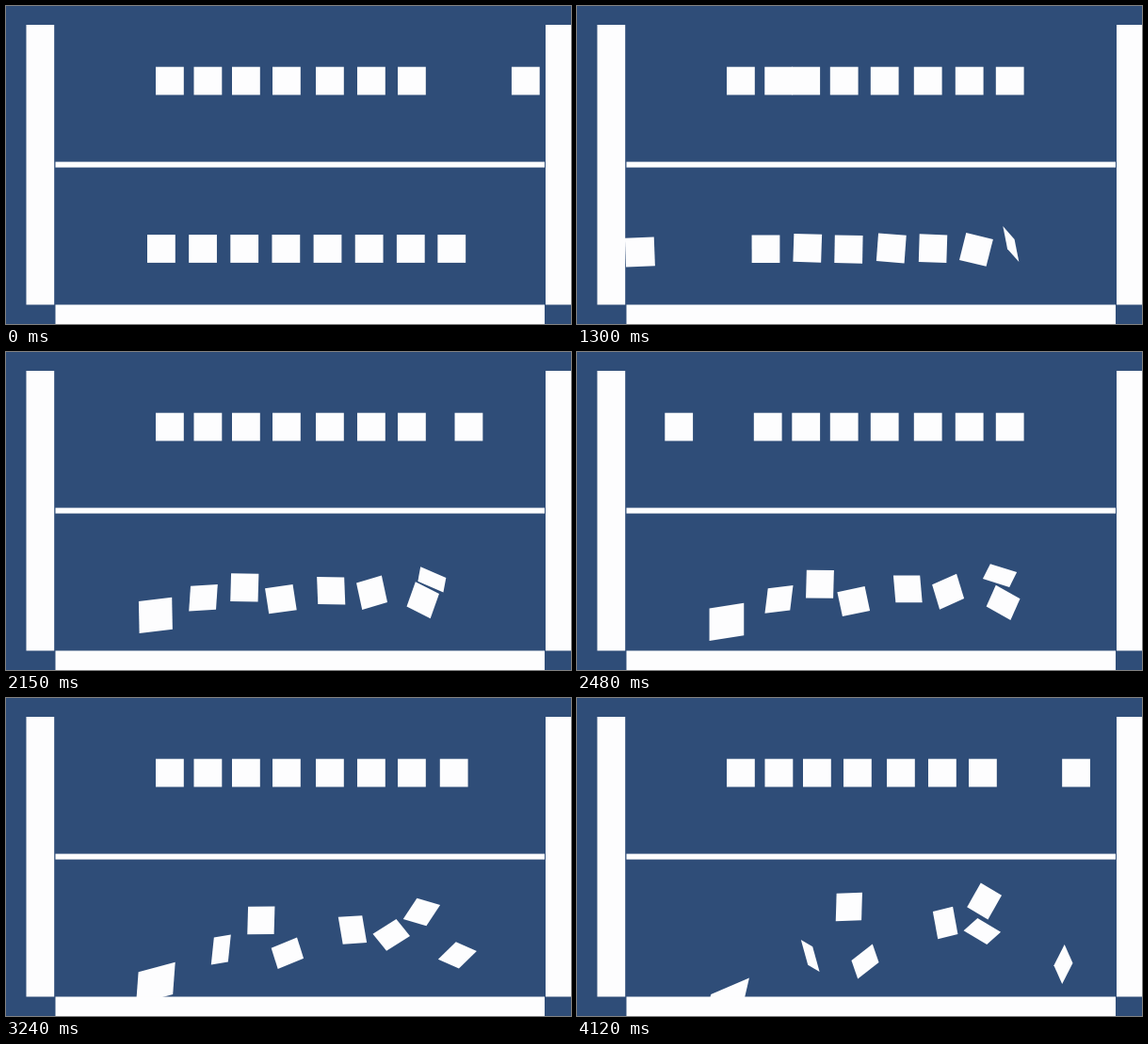
An HTML page with a canvas that plays this animation: 600x338 px, repeating every 4150 ms.

```html
<!DOCTYPE html>
<html lang="en">
<head>
<meta charset="utf-8">
<title>Colliding blocks</title>
<style>
html, body { margin: 0; width: 100%; height: 100%; overflow: hidden; background: #2f4d78; }
canvas { display: block; }
</style>
</head>
<body>
<canvas id="stage" width="600" height="338"></canvas>
<script>
const ctx = document.getElementById('stage').getContext('2d');
const LOOP = 4150, SIZE = 29.8;
const LEFT_WALL = 52, RIGHT_STOP = 543;

const clamp = v => Math.max(0, Math.min(1, v));
const lerp = (a, b, k) => a + (b - a) * k;
const rad = deg => deg * Math.PI / 180;

// Only one block of a row moves at a time; d is how far the push has travelled leftwards
function chain(right, left, d) {
  const out = [];
  for (let i = right.length - 1; i >= 0; i--) {
    const gap = right[i] - left[i];
    out[i] = right[i] - Math.max(0, Math.min(gap, d));
    d -= gap;
  }
  return out;
}
// Each pushed block stops against the resting place of its left neighbour
const pushed = (row, reach) => [LEFT_WALL, ...row.slice(0, -1).map(x => x + reach)];

// Upper row: the push runs back and forth between the walls, slowing a little
const upper = [159, 199.5, 240, 283, 329, 373, 416, RIGHT_STOP];
const upperLeft = pushed(upper, 28.8);
const span = upper.reduce((sum, x, i) => sum + x - upperLeft[i], 0);

function upperRow(t) {
  const d = (5.5 + 0.5805 * t - 6.5e-6 * t * t) % (2 * span);
  return chain(upper, upperLeft, Math.min(d, 2 * span - d));
}

// Lower row: one clean round trip, then a second push that knocks the blocks loose
const TURN_BACK = 290, SECOND = 580, REBOUND = 1336;
const home = Array.from({ length: 8 }, (_, i) => 150 + 44.15 * i);
const shifted = home.map(x => x + 1.8);
const loose = [...shifted.slice(0, 7), RIGHT_STOP];

function lowerPlaces(t) {
  if (t < SECOND) {
    const row = t < TURN_BACK ? home : shifted;
    return chain(row, pushed(row, 30), 0.69 * (TURN_BACK - Math.abs(TURN_BACK - t)));
  }
  const places = chain(loose, pushed(shifted, 33), Math.abs(78 - 0.476 * (t - SECOND)));
  places[0] += Math.max(0, Math.min(92, 0.113 * (t - REBOUND)));
  return places;
}

// Drift in pixels, angles in degrees; lean is the direction of the tilt and swings round
const tumbles = [
  { dx: 0, dy: 64, turn: -8, tilt: 62, lean: -35, swing: 0, pace: 1, grow: 20 },
  { dx: 48, dy: 16, turn: 0, tilt: 72, lean: 15, swing: -128 },
  { dx: 45, dy: -36, turn: 0, tilt: 25, lean: 110, swing: 0 },
  { dx: 18, dy: 22, turn: -30, tilt: 51, lean: 25, swing: -63 },
  { dx: 59, dy: -19, turn: -12, tilt: 43, lean: 15, swing: 75 },
  { dx: 54, dy: -10, turn: -52, tilt: 52, lean: -133, swing: 178 },
  { dx: 96, dy: 25, turn: 45, tilt: 62, lean: 152, swing: -258 },
  { dx: -32, dy: -42, turn: 30, tilt: 30, lean: 80, swing: -160, pace: 1, kick: 85 }
];

function tumble(x, i, t) {
  const { dx, dy, turn, tilt, lean, swing, pace = 1.5, grow = 0, kick = 0 } = tumbles[i];
  const hit = 925 + 30 * (7 - i);
  const shake = clamp((t - hit) / (1300 - hit));
  const k = clamp((t - hit) / (4120 - hit));
  return {
    x: x + SIZE / 2 + dx * k ** pace,
    y: 258 + dy * k ** pace,
    size: SIZE + grow * k,
    turn: rad(lerp(2 * (i - 1) * shake, turn, k)),
    tilt: rad(lerp(kick * shake, tilt, k ** 0.8)),
    lean: rad(lean + swing * k)
  };
}

// Square seen after a turn in the plane and a tilt out of it
function drawTilted({ x, y, size, turn, tilt, lean }) {
  const p = size / 2 * Math.cos(tilt / 2) ** 2, q = size / 2 * Math.sin(tilt / 2) ** 2;
  const a = p * Math.cos(turn), b = p * Math.sin(turn);
  const c = q * Math.cos(2 * lean), d = q * Math.sin(2 * lean);
  ctx.beginPath();
  for (const [m, n] of [[-1, -1], [1, -1], [1, 1], [-1, 1]])
    ctx.lineTo(x + m * (a + c) + n * (d - b), y + m * (b + d) + n * (a - c));
  ctx.fill();
}

function draw(t) {
  ctx.fillStyle = '#2f4d78';
  ctx.fillRect(0, 0, 600, 338);
  ctx.fillStyle = '#fdfdfe';
  for (const x of upperRow(t)) ctx.fillRect(x, 64.7, SIZE, SIZE);
  lowerPlaces(t).forEach((x, i) => drawTilted(tumble(x, i, t)));
  ctx.fillRect(21.5, 20, 29.7, 297.5);
  ctx.fillRect(573, 20, 27, 297.5);
  ctx.fillRect(52.5, 165.6, 519.5, 6);
  ctx.fillRect(52.5, 317.5, 519.5, 20.5);
}

const start = performance.now();
function tick() {
  draw((performance.now() - start) % LOOP);
  requestAnimationFrame(tick);
}
tick();
</script>
</body>
</html>
```
